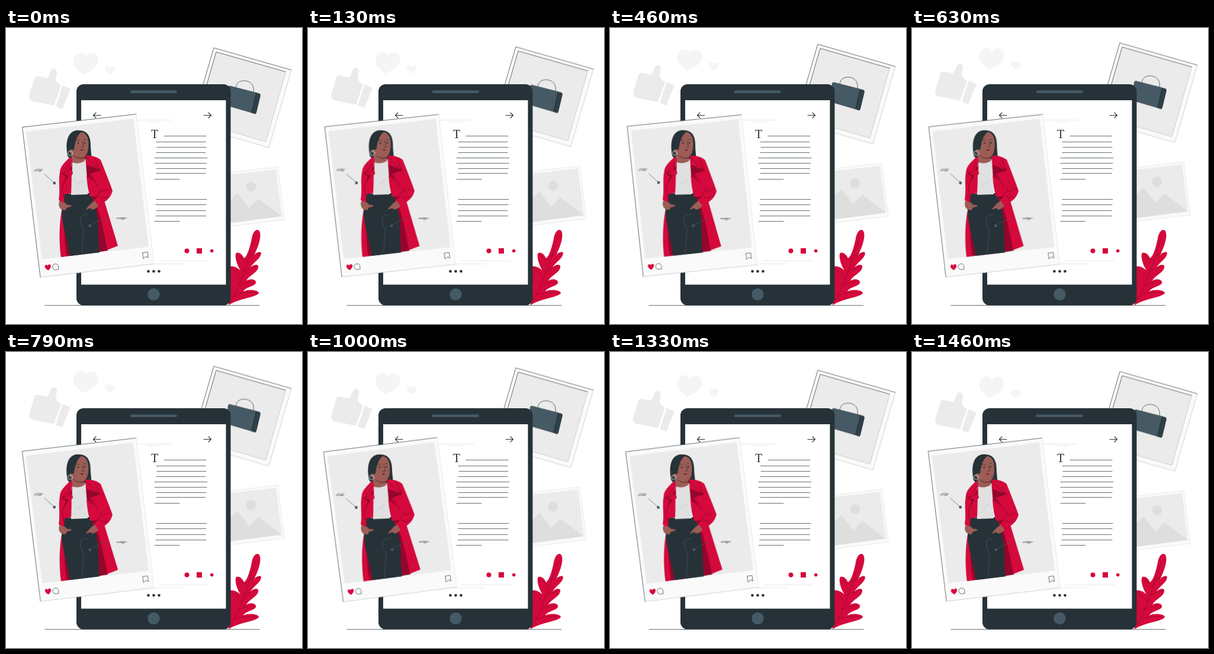
Write an HTML page that moves like this. It is 500 px wide and 500 px high and loops after 1.5 s.

```html
<!DOCTYPE html>
<html lang="en">
<head>
<meta charset="utf-8">
<title>Fashion blog</title>
<style>
  html, body { margin: 0; width: 100%; height: 100%; overflow: hidden; background: #fff; }
  svg { display: block; width: 100vw; height: 100vh; }
  .ink { fill: #263238; }
  .slate { fill: #455a64; }
  .red { fill: #d5093c; }
  .wine { fill: #94062c; }
  .skin { fill: #9b5d55; }
  .paper { fill: #fafafa; }
  .photo { fill: #ebebeb; }
  .grey { fill: #e0e0e0; }
  .line { fill: none; stroke: #263238; stroke-width: .7; stroke-linecap: round; stroke-linejoin: round; }
  .soft { stroke: #bdbdbd; }
  .pale { stroke: #e0e0e0; }
  .fold { stroke: #6f0a26; }
  .vein { stroke: #8d0c30; }
  .blue { stroke: #455a64; }
  #card { transform-origin: 138.5px 283px; }
</style>
</head>
<body>
<svg viewBox="0 0 500 500">
  <defs>
    <clipPath id="frame"><path d="M34 175L215 153L241 369.500L61 390.500Z"/></clipPath>
  </defs>

  <!-- reactions -->
  <g class="float">
    <path class="photo" d="M48 85Q50 81 55 82L69 85C74 81 74 71 79 69C86 67 87 74 85 80C83 87 85 91 88 94L93 97L81 131L45 124Q39 122 39 116Q40 108 43 102Z"/>
    <path class="photo" d="M96 97L109 103L95 137L84 132.500Z"/>
    <path fill="#f5f5f5" d="M130 78.500C121 72 113 65 114 54C115 42 130 37 135 48C140 39 154 41 156 53C157 65 142 74 130 78.500Z"/>
    <path fill="#f5f5f5" d="M175 78.500C171 75 166 72 167 67.500C168 63 174 63.500 176 67C178 63 184 64 184 69C183 74 179 76 175 78.500Z"/>
  </g>

  <!-- bag picture -->
  <g class="float">
    <path class="paper" d="M351 33.500L482 71L444 202L313 164Z"/>
    <path class="line" d="M313 164L351 33.500L482 71"/>
    <path class="line soft" d="M482 71L444 202L313 164"/>
    <path class="photo" d="M355 40.500L472.500 74L439 192L321 158Z"/>
    <path class="line" d="M321 158L355 40.500L472.500 74"/>
    <path class="line soft" d="M472.500 74L439 192L321 158"/>
    <path class="line" d="M388 103C388 94 393 89 403 89C414 90 420 97 418 109"/>
    <path class="slate" d="M378 98L423 109.500L415 143L374 131Q371 130 372 126L375 100Q376 97 378 98Z"/>
    <path fill="#2f3f48" d="M422 109L428 110.500Q430 111 430 114L423 143Q422 146 419 145L414 143Z"/>
    <path class="line" d="M378 98L423 109.500L415 143L374 131"/>
  </g>

  <!-- placeholder picture -->
  <g class="float">
    <path class="paper" d="M352 247L459 234.500L470 324L363 337Z"/>
    <path class="line pale" d="M352 247L459 234.500L470 324L363 337Z"/>
    <path class="photo" d="M358 250L456 239L466 318L366 331Z"/>
    <path fill="#dedede" d="M366 331L364 306L391 278L411 304L426 288L466 318Z"/>
    <circle fill="#dedede" cx="414" cy="268" r="8.400"/>
  </g>

  <path class="line" d="M66 468.500H428"/>

  <!-- leaf -->
  <path class="red" d="M376 468L378 403C386 401 391 406 396 409C389 399 385 381 390 379.500C396 379 400 384 402 389C408 385 412 370 415 356C417 343 424 338 428 343C432 350 428 366 419 384C424 378 431 376 431 381C430 390 417 396 413 405C418 399 428 398 426 405C424 414 410 418 406 427C413 422 424 425 422 431C419 437 405 437 401 445C410 440 428 443 427 448C420 456 395 456 376 468Z"/>
  <path class="line vein" d="M378 466C391 442 405 408 421 354M409 386C416 383 421 381 426 380M407 393C399 390 395 387 391 383M400 411C409 408 416 405 422 403M396 421C390 414 386 410 381 407M391 435C401 431 410 429 418 429M385 451C397 447 410 446 422 447"/>

  <!-- tablet -->
  <rect class="ink" x="119" y="95" width="260.500" height="373.500" rx="12"/>
  <rect x="127" y="122" width="244.500" height="311.500" fill="#fff"/>
  <rect class="slate" x="210" y="105.500" width="78.500" height="4.500" rx="1"/>
  <circle class="slate" cx="249.500" cy="450" r="10.200"/>
  <path class="line" style="stroke-width:1.100" d="M160 147.500H148M152 143L147.500 147.500L152 152M334 147.500H346M342 143L346.500 147.500L342 152"/>
  <path class="line pale" d="M222 155.500H280M240 158.500H264M259 393.500H342M249 398.500H299"/>
  <text class="ink" x="245" y="185.500" font-family="'Liberation Serif', serif" font-size="20">T</text>
  <g id="copy"></g>
  <g class="ink">
    <circle cx="240.500" cy="411" r="2.300"/><circle cx="249.500" cy="411" r="2.300"/><circle cx="258.500" cy="411" r="2.300"/>
  </g>
  <g class="red">
    <circle cx="305.500" cy="376.500" r="4"/><rect x="322" y="372" width="9" height="9"/><circle cx="347.700" cy="376.500" r="2.800"/>
  </g>

  <!-- outfit card -->
  <g id="card">
    <path class="paper" d="M27.500 167.500L220 145.500L250 398.500L58 421Z"/>
    <path class="line" d="M220 145.500L27.500 167.500L58 421"/>
    <path class="line soft" d="M58 421L250 398.500"/>
    <path class="line pale" d="M220 145.500L250 398.500"/>
    <path class="photo" d="M34 175L215 153L241 369.500L61 390.500Z"/>

    <g clip-path="url(#frame)">
      <!-- coat body -->
      <path class="wine" d="M98 280H155L172 376L94 388Z"/>
      <path class="red" d="M95 304L101 306C97 330 98 360 103 388L93 389C89 360 90 325 95 304Z"/>
      <path class="red" d="M146 290L164 285L189 368L171 375C166 345 160 320 154 302Z"/>
      <!-- trousers -->
      <path class="ink" d="M98 280L142 279C147 288 152 303 154 317C157 338 155 360 158 380L108 386C105 360 94 333 94 308C94 297 96 288 98 280Z"/>
      <path class="line blue" d="M128 384L131 340Q124 330 126 319Q131 315 138 315"/>
      <!-- hair, head and top -->
      <path class="ink" d="M104 216C101 198 100 176 122 173C138 172 143 184 143 198C143 208 145 214 144 222L125 226L107 220Z"/>
      <path class="grey" d="M110 221C118 229 128 228 136 220L138 281L110 282Z"/>
      <path class="skin" d="M112 206C107 203 105 210 111 213L110 226C116 230 128 229 133 224V217C139 213 141 198 138 186C136 180 132 176 127 176C119 182 117 191 115 205Z"/>
      <path fill="#77413c" d="M113 214C119 219 128 220 133 217V220C125 223 117 220 113 214Z"/>
      <path class="ink" d="M128 174C119 182 118 192 113 204L104 206V189C106 177 116 170 128 174Z"/>
      <path class="line" d="M118 190Q121 188 124 190.500M131 189Q133 187 135 189M129 191L131.500 201L128 201.500"/>
      <g class="ink"><circle cx="122" cy="194.500" r="1.300"/><circle cx="133" cy="194" r="1.300"/></g>
      <path fill="#6b1730" d="M125.500 206Q128 204 131 206Q128 208.500 125.500 206Z"/>
      <circle class="line" style="stroke:#c5d0d5;stroke-width:1" cx="108.500" cy="211.500" r="3.800"/>
      <path class="line soft" d="M119 264Q126 263 129 257"/>
      <!-- hands -->
      <path class="skin" d="M91 291C88 296 89 303 93 306C98 309 103 308 102 304L111 301Q110 298 104 299L98 294Z"/>
      <path class="skin" d="M154 290L145 295C141 299 136 304 135 307L143 304C144 309 151 306 155 302L159 294Z"/>
      <!-- left front and sleeve -->
      <path class="red" d="M109 217C101 226 92 232 91 243C88 260 92 273 89 291L98 295L99 281L110 279C111 262 111 238 110 222Z"/>
      <path class="wine" d="M110 232L113 246L97 265L102 251L94 246L106 241Z"/>
      <path class="red" d="M110 219L111 239L96 247L106 249L97 264C105 258 109 253 112 246V222Z"/>
      <path class="line fold" d="M110 226C105 236 99 241 94 246L102 251L96 266C94 274 98 284 99 292"/>
      <!-- right front and sleeve -->
      <path class="red" d="M134 216C142 214 155 218 160 223C167 241 174 258 180 275C178 282 175 288 166 294L158 303L149 290L157 283C159 278 160 273 162 269L158 284L142 285C138 270 136 245 134 216Z"/>
      <path class="wine" d="M136 231L160 240L141 246L154 268L139 262C137 252 136 241 136 231Z"/>
      <path class="red" d="M136 249L156 265L157 285L142 283C138 273 137 260 136 249Z"/>
      <path class="line fold" d="M135 218C143 226 149 234 159 240L143 245L155 267M162 270C160 277 156 280 149 290M162 276L174 272M158 284Q167 290 171 284M150 220L158 239"/>
    </g>

    <!-- callouts -->
    <path class="line blue" d="M65 247L81 261M49 239.500Q55 237.500 62 239M48 241.500L60 240.500M55 242L60 241.500M142 333L159 324L168 322M188 322Q196 319 204 321M187 321L201 322M195 323.500L199 323"/>
    <circle class="slate" cx="81.700" cy="262" r="2.400"/>
    <circle class="slate" cx="141.500" cy="334" r="2.300"/>

    <!-- actions -->
    <path class="red" d="M71.500 409.500C67 407 64.500 404 66 401.500C67 399 70 400 70.500 402C71 399 74 398.500 75.500 400.500C77 403.500 74 407 71.500 409.500Z"/>
    <path class="line" d="M86 408A5 5 0 1 1 88.500 405L88.800 407.500Z"/>
    <path class="line" d="M231 379.500L239 378.500L240.300 388L236.200 386L232.300 389.500Z"/>
  </g>
</svg>
<script>
  // Article rows as [y, left, right]
  const rows = [
    [182, 267, 338], [192, 254, 337], [201, 255, 338], [210, 254, 337], [219, 251, 340],
    [228, 251, 339], [237, 254, 338], [245, 254, 337], [255, 251, 293],
    [289, 254, 339], [298, 253, 338], [308, 254, 337], [317, 253, 338], [326, 251, 293]
  ];
  document.getElementById('copy').innerHTML = rows
    .map(([y, x1, x2]) => `<path class="line" d="M${x1} ${y + .5}H${x2}"/>`)
    .join('');

  // 36 poses per loop, 24 a second
  const timing = { duration: 1500, iterations: Infinity, easing: 'steps(36)', delay: -2 };
  const loop = (el, steps) =>
    el.animate(steps.map(([offset, transform]) => ({ offset, transform })), timing);

  document.querySelectorAll('.float').forEach(el =>
    loop(el, [[0, 'translateY(0px)'], [.5, 'translateY(-10px)'], [1, 'translateY(0px)']]));

  loop(document.getElementById('card'), [
    [0, 'rotate(0deg)'], [.25, 'rotate(1deg)'], [.75, 'rotate(-1deg)'], [1, 'rotate(0deg)']
  ]);
</script>
</body>
</html>
```
